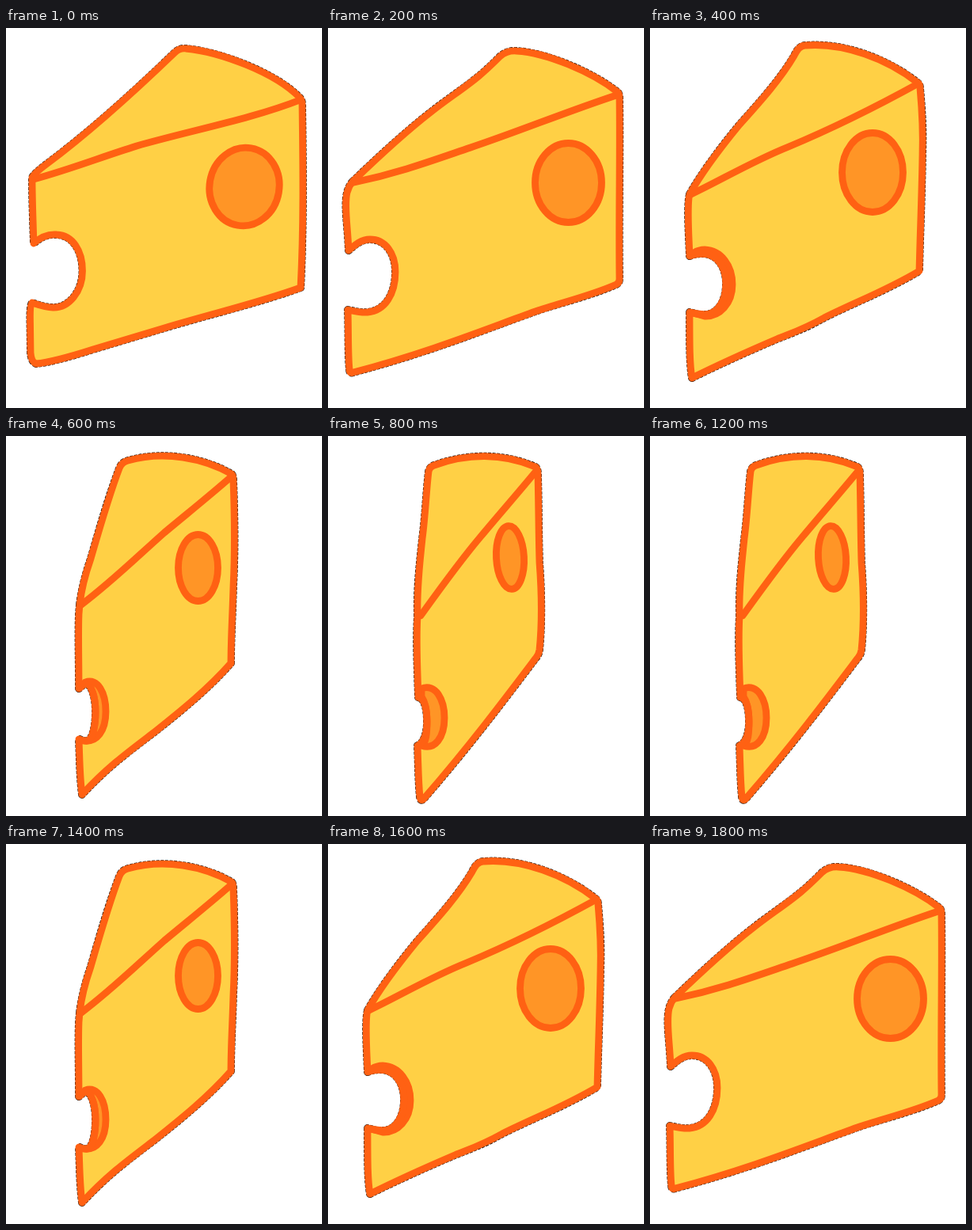
Write an HTML page that moves like this. It is 399 by 480 pixels and loops after 2000 ms.

```html
<!DOCTYPE html>
<html lang="en">
<head>
<meta charset="utf-8">
<title>Turning cheese</title>
<style>
  html, body { margin: 0; width: 100%; height: 100%; overflow: hidden; background: #fff; }
  svg { display: block; width: 399px; height: 480px; }
  path, ellipse {
    fill: none; stroke: #ff6113; stroke-width: 8.8;
    stroke-linejoin: round; stroke-linecap: round;
    vector-effect: non-scaling-stroke;
  }
  #fringe { stroke: #1c100a; stroke-width: 9.8; stroke-linecap: butt; stroke-dasharray: 4 1.5; }
  #body { fill: #ffd045; stroke: none; }
  #hole, #rim { fill: #ff9526; }
</style>
</head>
<body>
<svg viewBox="0 0 399 480">
  <g id="cheese">
    <path id="fringe"/>
    <path id="body"/>
    <path id="ridge"/>
    <ellipse id="hole"/>
    <path id="rim"/>
    <path id="edge"/>
  </g>
</svg>
<script>
const STEP = 200;
const $ = id => document.getElementById(id);

// Each pose: top, right side, base, bite and left side of the wedge,
// the ridge, the hole (cx, cy, rx, ry, tilt) and the depth of the bite.
const wide = {
  edge: `M33 189 Q35 184 51 172 C106 131 161 81 213 31 Q219 25 227 26
    C270 30 340 56 371 88 Q374 91 374 97 C375 175 376 250 372 328
    C320 347 260 361 200 379 L110 406 Q60 422 38 424 Q32 422 31 410 L30.5 372 Q30 350 33 347
    C42 350 50 353 59 353 C79 354 96.5 333 96.5 307 C96.5 281 84 262 64 261
    C54 260 44 264 35 272 C34 240 33 215 33 189Z`,
  ridge: 'M35 191 C80 179 120 163 165 149 C235 129 310 115 371 91',
  hole: [301, 200.5, 44, 49.5, 10], rim: ''
};

const broad = {
  edge: `M31 194 C60 166 99 130 130 106 C150 90 172 76 190 61 C200 53 208 45 217 36 Q226 28 238 29
    C275 31 333 55 366 81 Q368 83 368 88 C369 160 367 240 368 317 Q368 322 364 324
    C330 339 290 348 262 358 C200 380 130 409 32 435 Q27 437 27 431 C25 410 26 380 25 356
    C35 358 42 360 50 359 C72 357 85 336 85 308 C85 284 72 267 53 267
    C42 267 34 274 26 281 C25 250 20 225 24 208 Q26 200 31 194Z`,
  ridge: 'M33 195 C90 183 130 168 180 151 C240 131 300 106 367 84',
  hole: [303.5, 195.5, 42, 50, 0], rim: ''
};

const half = {
  edge: `M50 210 C65 183 90 150 113 122 C140 92 165 64 182 35 Q188 22 196 22
    C245 18 300 39 338 69 Q341 71 341 76 C344 110 345 130 344 160 C343 220 341 260 340 307
    C300 331 260 346 220 366 C195 380 185 383 160 393 C125 408 85 426 53 442
    C50 425 50 400 50 359 C58 361 64 363 70 362 C86 361 96 344 96 323
    C96 301 84 285 66 285 C60 285 56 286 50 288 C49 260 47 235 49 215Z`,
  ridge: 'M52 210 C90 192 130 168 175 150 C230 127 290 97 339 70',
  hole: [281, 182.5, 38.5, 50, 0],
  rim: `M55 284 C62 280 66 280 69 280 C90 281 104 300 104 324 C104 348 88 365 69 364 L55 360
    L70 362 C86 361 96 344 96 323 C96 301 84 285 66 285Z`
};

const slim = {
  edge: `M93 213 C95 195 101 172 107 155 C120 110 130 75 143 41 Q146 33 154 31
    C200 18 250 28 285 48 Q287 50 287 56 C289 110 289 150 287 190 C286 225 284 255 284 287
    C255 320 220 348 190 372 C160 395 130 416 96 453 C93 430 93 405 92 383
    C95 383 96 386 103 385 C110 382 113 365 113 348 C113 330 108 314 101 313
    C97 313 95 318 92 319 C92 280 91 250 92 225Z`,
  ridge: 'M94 214 C135 183 165 153 200 122 C230 97 260 73 286 50',
  hole: [242.5, 166.5, 25, 42, 0],
  rim: `M100 311 C116 305 126 325 126 348 C126 372 115 388 97 385
    L103 385 C110 382 113 365 113 348 C113 330 108 314 101 313Z`
};

const thin = {
  edge: `M113 228 C112 190 116 160 119 130 C123 100 124 70 127 45 Q128 39 134 37
    C175 22 220 21 262 39 Q265 41 265 48 C266 90 266 130 267 160 C270 200 270 240 267 270
    Q266 277 262 281 C225 330 180 390 122 457 Q117 463 116 456 C114 435 114 415 113 391
    C121 388 125 375 125 361 C125 345 122 335 117 331 L114 330 C113 295 111 260 113 228Z`,
  ridge: 'M117 227 C140 195 165 160 192 128 C217 98 240 72 263 44',
  hole: [230, 153.5, 17.5, 40, -3],
  rim: `M118 319 C136 312 147 333 147 356 C147 381 135 397 118 391
    C124 388 125 375 125 361 C125 345 122 335 118 329Z`
};

// The far end of the turn: the thin pose, squeezed and sheared a little.
const thinnest = { ...thin, turn: 'matrix(.85 -.07 0 1 28.5 13.3)' };

const cycle = [wide, broad, half, slim, thin, thinnest, thin, slim, half, broad];
let shown;

function draw(pose) {
  const [cx, cy, rx, ry, tilt] = pose.hole;
  for (const id of ['fringe', 'body', 'edge']) $(id).setAttribute('d', pose.edge);
  $('ridge').setAttribute('d', pose.ridge);
  $('rim').setAttribute('d', pose.rim);
  const hole = { cx, cy, rx, ry, transform: `rotate(${tilt} ${cx} ${cy})` };
  for (const key in hole) $('hole').setAttribute(key, hole[key]);
  $('cheese').setAttribute('transform', pose.turn || 'translate(0 0)');
}

function tick() {
  const pose = cycle[Math.floor(performance.now() / STEP) % cycle.length];
  if (pose !== shown) draw(shown = pose);
  requestAnimationFrame(tick);
}
tick();
</script>
</body>
</html>
```
